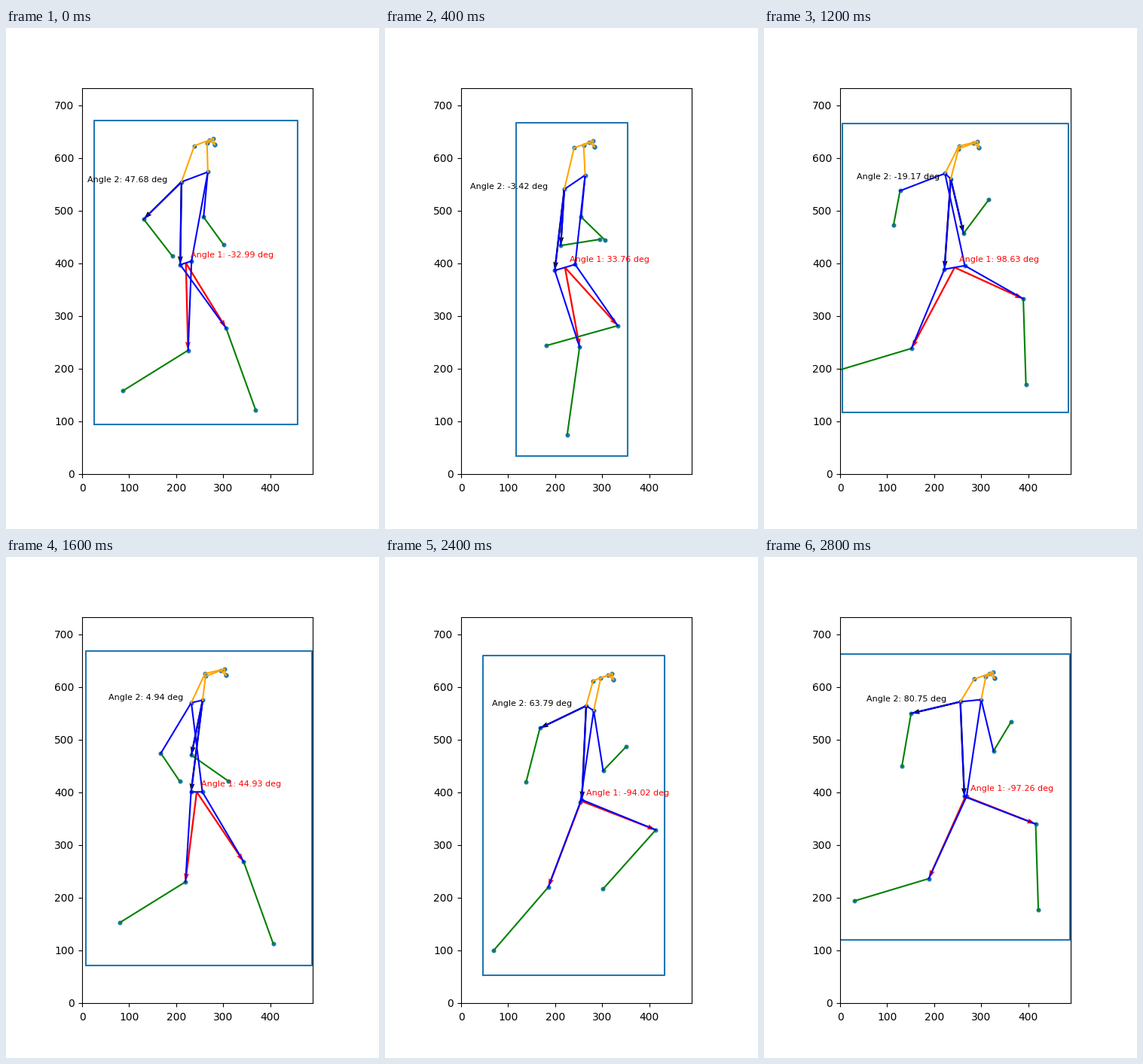
Write a matplotlib script that moves like this. It is 495 by 666 pixels and loops after 3.2 s.

```python
import numpy as np
import matplotlib.pyplot as plt
from matplotlib.animation import FuncAnimation

W, H, DPI = 495, 666, 100
LEFT, RIGHT, TOP, BOTTOM = 101, 407, 80, 593
XMAX, YMAX = 490, 732.5
STEPS = 8  # poses in one full stride

BONES = {
    "green": ["ankle knee", "elbow wrist"],
    "blue": ["knee hip", "shoulder hip", "shoulder elbow"],
    "orange": ["nose eye", "eye ear", "ear shoulder"],
}
CROSS = {"blue": ["hip", "shoulder"], "orange": ["eye"], "green": []}

# Measured angles and limb directions (degrees, 0 = down, + = forward)
HIP_ANGLE = [-32.99, 33.76, 96.80, 98.63, 44.93, -20.43, -94.02, -97.26]
ARM_ANGLE = [47.68, -3.42, -21.85, -19.17, 4.94, 26.95, 63.79, 80.75]
THIGH = [39, 20, -15, -25, -4, 32, 70, 71]
SHIN = [22, -9, -44, -75, -61, -76, -45, 2]
FAR_ARM = [-6, -6, -67, -71, -34, 1, 10, 15]
FOREARM = [41, 98, 145, 140, 58, -4, -16, -11]
FAR_FOREARM = [39, 49, -16, -12, 37, 89, 133, 146]

# Bounding box edges in stage pixels
BOX_LEFT = [117, 174, 117, 104, 106, 175, 130, 101]
BOX_RIGHT = [387, 322, 359, 404, 406, 336, 371, 406]
BOX_BOTTOM = [527, 569, 556, 511, 543, 574, 556, 509]


def wave(k, mean, amp, peak, beats=1):
    return mean + amp * np.cos(2 * np.pi * beats * (k - peak) / STEPS)


def to_data(x, y):
    return np.array([(x - LEFT) * XMAX / (RIGHT - LEFT),
                     (BOTTOM - y) * YMAX / (BOTTOM - TOP)])


def reach(start, length, angle):
    t = np.radians(angle)
    return start + length * np.array([np.sin(t), -np.cos(t)])


def heading(start, end):
    dx, dy = end - start
    return np.degrees(np.arctan2(dx, -dy))


def pair(x, y, dx, dy):
    """Near and far joint on both sides of a centre."""
    return [to_data(x + s * dx / 2, y + s * dy / 2) for s in (-1, 1)]


def pose(k):
    """Joints as {name: [near, far]} in data units."""
    hx = wave(k, 238.7 + 3.6 * k, -3.5, 1, 2)
    hy = wave(k, 318.3, -6, 0, 2)
    sx = hx + wave(k, 6, 8, 7) + wave(k, 0, 7, 1, 2)
    sy = hy - wave(k, 114.3 + 1.5 * k, 2.5, 3, 2)
    nx = wave(k, 277 + 3.7 * k, 4, 6)
    ny = wave(k, 157.5 + 0.5 * k, -2.5, 0, 2)

    j = {
        "hip": pair(hx, hy, wave(k, 15, 17, 2), wave(k, -2.5, -6, 1.5)),
        "shoulder": pair(sx, sy, wave(k, 10, 25, 0), wave(k, -5, -14, 1.2)),
        "nose": [to_data(nx, ny)] * 2,
        "eye": [to_data(nx - 7, ny - 6), to_data(nx - 2, ny - 8)],
        "ear": [to_data(nx - 27, ny + 1.5),
                to_data(nx + wave(k, -19, 9, 7.7), ny - 2)],
    }
    mid = to_data(hx, hy)
    knee = reach(j["hip"][0], wave(k, 163, 9, 4.6), THIGH[k])
    far_knee = reach(mid, wave(k, 166, 12, 6),
                     heading(mid, knee) + HIP_ANGLE[k])
    j["knee"] = [knee, far_knee]
    # The far leg repeats the near one half a stride later
    j["ankle"] = [reach(j["knee"][s], wave(q, 163, 6, 1), SHIN[q])
                  for s, q in enumerate((k, (k + STEPS // 2) % STEPS))]

    near, far = j["shoulder"]
    arm = heading(near, j["hip"][0]) - ARM_ANGLE[k]
    j["elbow"] = [reach(near, 107, arm),
                  reach(far, wave(k, 101, 21, 5), FAR_ARM[k])]
    j["wrist"] = [reach(j["elbow"][0], wave(k, 93, 13, 6), FOREARM[k]),
                  reach(j["elbow"][1], 67, FAR_FOREARM[k])]
    return j


def line(a, b, color):
    ax.plot([a[0], b[0]], [a[1], b[1]], color=color)


def arrows(start, ends, color):
    d = np.array(ends) - start
    ax.quiver([start[0]] * 2, [start[1]] * 2, d[:, 0], d[:, 1], color=color,
              angles="xy", scale_units="xy", scale=1)


def draw(k):
    j = pose(k)
    ax.clear()
    ax.set_xlim(0, XMAX)
    ax.set_ylim(0, YMAX)
    ax.set_xticks(range(0, 401, 100))
    ax.set_yticks(range(0, 701, 100))
    ax.tick_params(axis="x", pad=5.5)
    ax.tick_params(axis="y", pad=4)

    dots = np.array([p for sides in j.values() for p in sides])
    ax.scatter(dots[:, 0], dots[:, 1], s=8, linewidths=1.5, color="tab:blue")

    x0, y0 = to_data(BOX_LEFT[k], BOX_BOTTOM[k])
    x1 = to_data(BOX_RIGHT[k], 0)[0]
    y1 = j["nose"][0][1] + 45
    ax.plot([x0, x1, x1, x0, x0], [y0, y0, y1, y1, y0], color="tab:blue")

    for color, bones in BONES.items():
        for bone in bones:
            a, b = bone.split()
            for side in (0, 1):
                line(j[a][side], j[b][side], color)
        for name in CROSS[color]:
            line(*j[name], color)

    hip, shoulder = sum(j["hip"]) / 2, j["shoulder"][0]
    arrows(hip, j["knee"], "red")
    arrows(shoulder, [j["elbow"][0], j["hip"][0]], "black")
    ax.text(hip[0] + 10, hip[1] + 10, f"Angle 1: {HIP_ANGLE[k]:.2f} deg",
            color="red", fontsize=8)
    ax.text(shoulder[0] - 200, shoulder[1], f"Angle 2: {ARM_ANGLE[k]:.2f} deg",
            color="black", fontsize=8)
    return []


fig = plt.figure(figsize=(W / DPI, H / DPI), dpi=DPI)
ax = fig.add_axes([LEFT / W, (H - BOTTOM) / H,
                   (RIGHT - LEFT) / W, (BOTTOM - TOP) / H])
anim = FuncAnimation(fig, draw, frames=STEPS, interval=400,
                     init_func=lambda: draw(0), repeat=True, repeat_delay=0)
plt.show()
```
